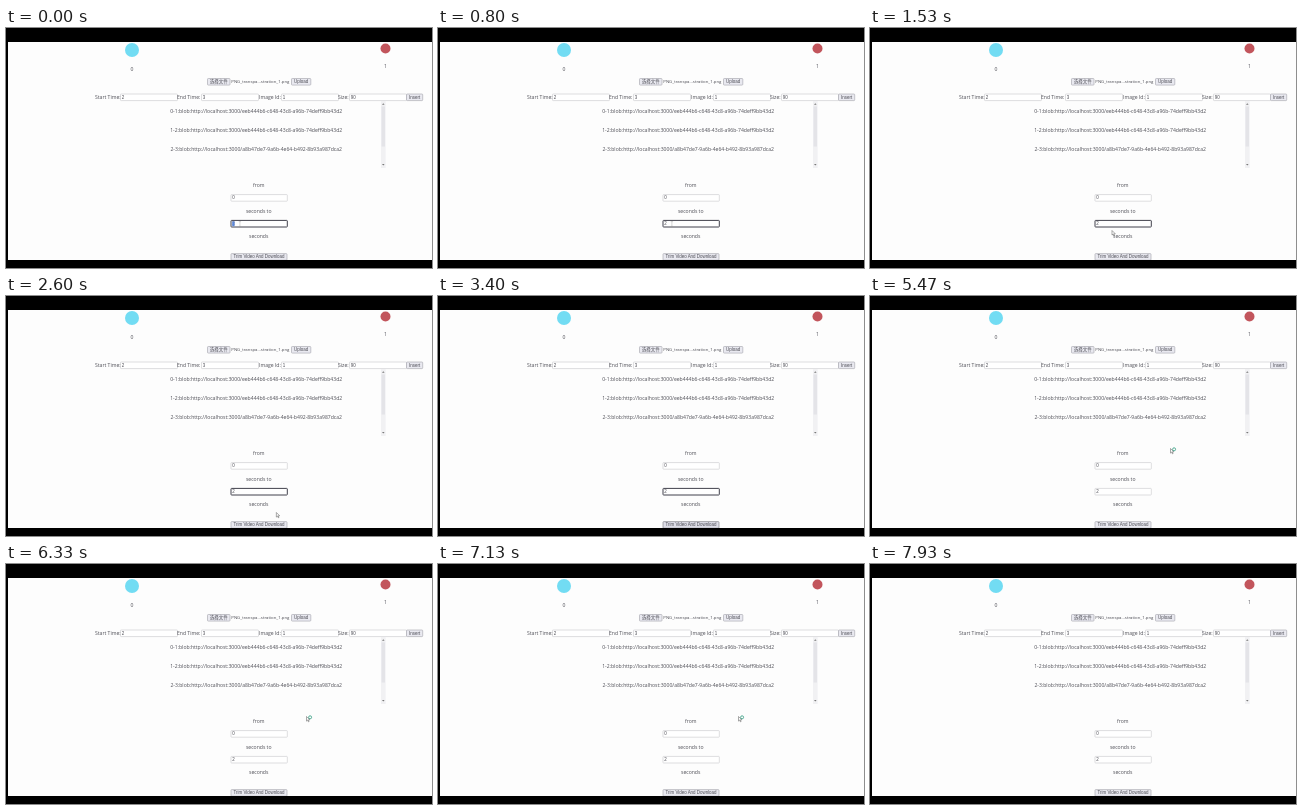
Recreate the animation shown at these times as an HTML page. Size 426 by 240 pixels, loop 8000 ms.

```html
<!DOCTYPE html>
<html lang="en">
<head>
<meta charset="utf-8">
<title>Video trimmer</title>
<style>
  html, body { margin: 0; width: 100%; height: 100%; overflow: hidden; background: #000; }
  svg { display: block; width: 100%; height: 100%; }
  text { font: 5.08px "Open Sans", "Noto Sans", sans-serif; fill: #4c4c54; }
  .control { font: 4.45px "Liberation Sans", "Noto Sans CJK SC", "Noto Sans CJK", Arial, sans-serif; }
  .file { font-size: 4.3px; }
  .middle { text-anchor: middle; }
  .field { fill: #fff; stroke: #c8c8cc; stroke-width: .6; }
  .field.focused { stroke: #40404c; stroke-width: 1; }
  .button { fill: #e9e9f0; stroke: #a2a2aa; stroke-width: .6; }
  .button.hover { fill: #dcdce6; stroke: #77777f; }
</style>
</head>
<body>
<svg viewBox="0 0 426 240">
  <rect x="2" y="14" width="424" height="218" fill="#fdfdfd"/>
  <circle cx="126" cy="22" r="7" fill="#72dcf3"/>
  <circle cx="379.5" cy="20.5" r="5" fill="#c2555c"/>
  <g id="page"></g>
  <g id="scrollbar">
    <rect x="375" y="73" width="4.6" height="67" fill="#f1f1f3"/>
    <rect x="375.6" y="78.5" width="3.4" height="40" fill="#e4e4e8"/>
    <path d="M376 76.8l1.3-1.6 1.3 1.6zM376 136l1.3 1.6 1.3-1.6z" fill="#777"/>
  </g>
  <rect id="selection" x="226.2" y="193.4" width="2.4" height="4.8" fill="#5b86d8"/>
  <path id="ibeam" d="M232.7 193.6h2.4M233.9 193.6v4.8M232.7 198.4h2.4" fill="none" stroke="#999" stroke-width=".4"/>
  <g id="cursor">
    <path d="M0 0v4.6l1.1-1 .8 1.7.7-.3-.8-1.7h1.5z" fill="#fff" stroke="#555" stroke-width=".5"/>
    <circle id="busy" cx="3.6" cy=".8" r="1.5" fill="none" stroke="#45a58c" stroke-width=".9"/>
  </g>
  <rect y="232" width="426" height="8"/>
</svg>
<script>
const LOOP = 8000;
const page = document.getElementById('page');
const [selection, ibeam, cursor, busy] =
  ['selection', 'ibeam', 'cursor', 'busy'].map(id => document.getElementById(id));

function add(tag, attributes, content = '') {
  const node = document.createElementNS('http://www.w3.org/2000/svg', tag);
  for (const [key, value] of Object.entries(attributes)) node.setAttribute(key, value);
  node.textContent = content;
  page.append(node);
  return node;
}
const label = (x, y, content, kind = '') => add('text', { x, y, class: kind }, content);
const centred = (x, y, content) => label(x, y, content, 'middle');

function field(x, y, width, value) {
  const box = add('rect', { x, y, width, height: 6.6, rx: .6, class: 'field' });
  return { box, value: label(x + 1.2, y + 4.5, value, 'control') };
}
function button(x, y, width, content) {
  const box = add('rect', { x, y, width, height: 6.6, rx: .8, class: 'button' });
  label(x + width / 2, y + 4.8, content, 'control middle');
  return box;
}

centred(126, 42.8, '0');
centred(379.5, 40.4, '1');
button(201.5, 50.5, 22.5, '选择文件');
label(225.3, 55.2, 'PNG_transpa…stration_1.png', 'file');
button(285.5, 50.5, 19.3, 'Upload');

[[89, 'Start Time:', 114.5, '2'], [171, 'End Time:', 195.5, '3'],
 [253, 'Image Id:', 275.5, '1'], [332, 'Size:', 343.5, '90']]
  .forEach(([x, name, fieldX, value]) => {
    field(fieldX, 66, 57, value);
    label(x, 71, name);
  });
button(400.5, 66, 16.2, 'Insert');

['0-1:blob:http://localhost:3000/eeb444b6-c648-43c8-a96b-74deff9bb43d2',
 '1-2:blob:http://localhost:3000/eeb444b6-c648-43c8-a96b-74deff9bb43d2',
 '2-3:blob:http://localhost:3000/a8b47de7-9a6b-4e64-b492-8b93a987dca2']
  .forEach((line, i) => centred(250.2, 84.8 + i * 19.3, line));

centred(252.7, 158.5, 'from');
field(225, 166.6, 56.3, '0');
centred(252.7, 184.6, 'seconds to');
const end = field(225, 192.4, 56.3, '3');
centred(252.7, 210.3, 'seconds');
const trim = button(225, 225.6, 56, 'Trim Video And Download');

// Pointer stops: time, x, y
const path = [[900, 234, 196], [1450, 242, 202.5], [1800, 242, 202.5],
  [2500, 270.8, 214.5], [2900, 268, 227], [3700, 268, 227], [4400, 300.5, 152.5], [LOOP, 300.5, 152.5]];

function pointerAt(t) {
  const i = Math.max(1, path.findIndex(stop => stop[0] >= t));
  const [t0, x0, y0] = path[i - 1], [t1, x1, y1] = path[i];
  const k = Math.max(0, (t - t0) / (t1 - t0));
  const eased = k * k * (3 - 2 * k);
  return [x0 + (x1 - x0) * eased, y0 + (y1 - y0) * eased];
}
const show = (node, visible) => node.setAttribute('visibility', visible ? 'visible' : 'hidden');
const within = (t, from, to) => t >= from && t < to;

function draw(now) {
  const t = now % LOOP;
  const overButton = within(t, 2900, 3750);
  end.value.textContent = t < 650 ? '3' : '2';
  end.box.classList.toggle('focused', t < 3550);
  trim.classList.toggle('hover', overButton);
  show(selection, t < 650);
  show(ibeam, t < 900);
  show(cursor, within(t, 900, 7200) && !overButton);
  show(busy, within(t, 5400, 7200));
  cursor.setAttribute('transform', `translate(${pointerAt(t)})`);
}

const start = performance.now();
function tick() {
  draw(performance.now() - start);
  requestAnimationFrame(tick);
}
tick();
</script>
</body>
</html>
```
